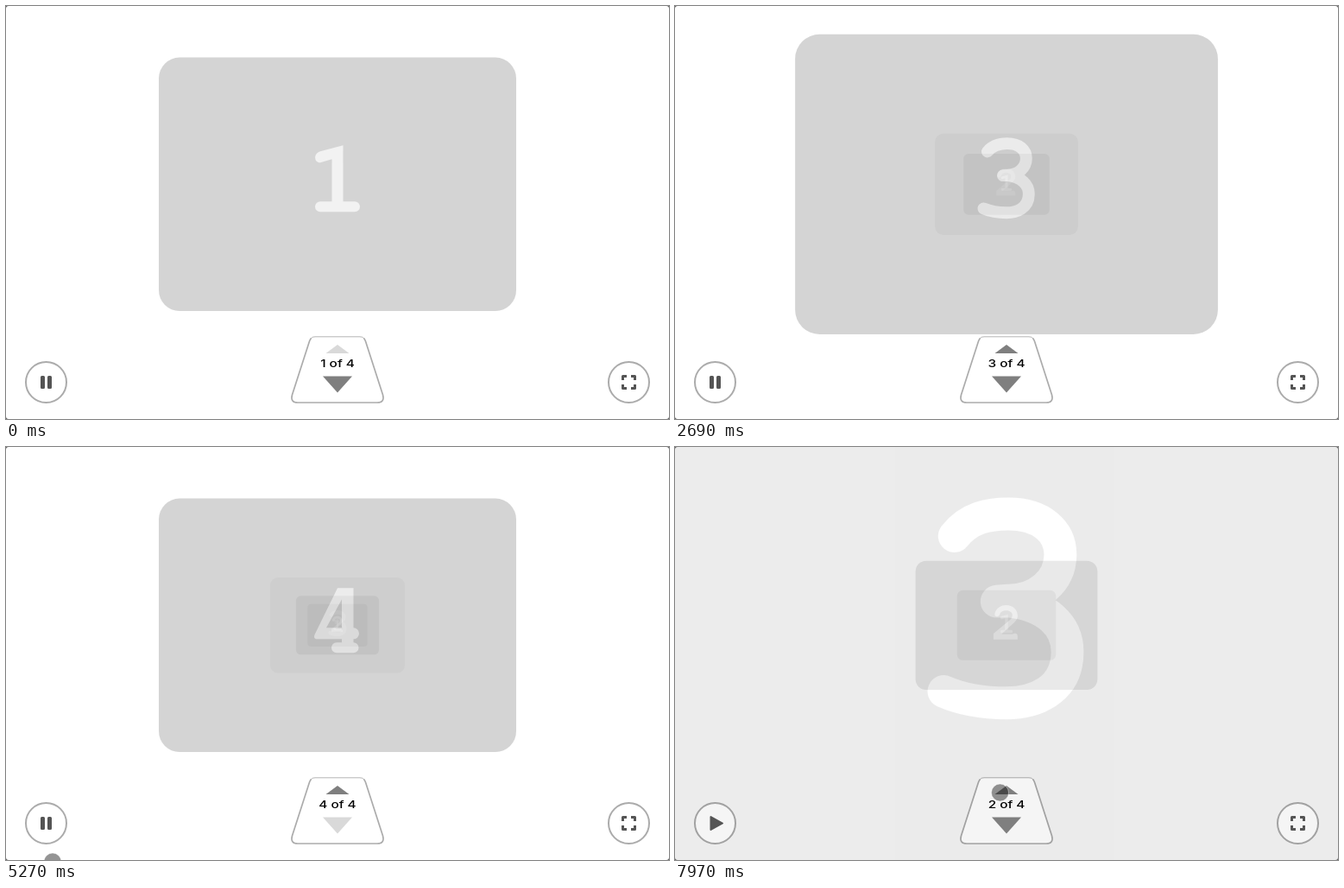
Animation of 768x478 px, one loop 8000 ms. Source, as an HTML page:

```html
<!DOCTYPE html>
<html lang="en">
<head>
<meta charset="utf-8">
<title>Depth carousel</title>
<style>
  html, body { margin: 0; width: 100%; height: 100%; overflow: hidden; background: #fff; }
  svg { display: block; width: 100vw; height: 100vh; }
  text { font: 500 11.8px Inter, sans-serif; text-anchor: middle; }
</style>
</head>
<body>
<svg viewBox="0 0 768 478" preserveAspectRatio="none">
  <rect width="768" height="478" fill="#fff"/>
  <g id="cards"></g>

  <g fill="#fff" fill-opacity=".5" stroke="#000" stroke-opacity=".33" stroke-width="2">
    <circle cx="46.5" cy="435.5" r="23.5"/>
    <circle cx="721.5" cy="435.5" r="23.5"/>
    <path stroke="none" d="M358 383H410Q415 383 416.500 388L436.500 450Q439 459 430 459H338Q329 459 331.500 450L351.500 388Q353 383 358 383Z"/>
    <path fill="none" stroke-width="1.700" d="M353.500 384.500Q352.300 386 351.500 388L331.500 450Q329 459 338 459H430Q439 459 436.500 450L416.500 388Q415.700 386 414.500 384.500"/>
    <path fill="none" stroke-width=".9" d="M353.500 384.500Q355 382.800 358 382.800H410Q413 382.800 414.500 384.500"/>
  </g>
  <g fill="#555">
    <path id="pause" d="M41.500 428H43.500Q45 428 45 429.500V441.500Q45 443 43.500 443H41.500Q40 443 40 441.500V429.500Q40 428 41.500 428ZM49.500 428H51.500Q53 428 53 429.500V441.500Q53 443 51.500 443H49.500Q48 443 48 441.500V429.500Q48 428 49.500 428Z"/>
    <path id="play" stroke="#555" stroke-width="2" stroke-linejoin="round" d="M41.500 428V443L55 435.500Z"/>
  </g>
  <path d="M714.500 433V428.500H719M724 428.500H728.500V433M728.500 438V442.500H724M719 442.500H714.500V438"
        fill="none" stroke="#555" stroke-width="3" stroke-linejoin="round"/>
  <path id="up" d="M384 392L397.500 402H370.500Z"/>
  <path id="down" d="M367 428.500H401L384 447.500Z"/>
  <text id="label" transform="translate(384 418) scale(1.300 1)"></text>

  <g id="pointer">
    <circle r="10" fill="#000" fill-opacity=".42" stroke="#fff" stroke-opacity=".4"/>
    <circle id="ring" r="21.500" fill="none" stroke="#000" stroke-width="1.500"/>
  </g>
  <path fill="#555" d="M0 0H3Q0 0 0 3ZM768 0V3Q768 0 765 0ZM0 478V475Q0 478 3 478ZM768 478H765Q768 478 768 475Z"/>
</svg>
<script>
const LOOP = 8000, SLIDE = 520, LABEL_LAG = 20;
const SPACING = 1.655; // depth between cards, in perspective units
const SHADES = [198, 180, 60, 85];
const DIGIT_SHADE = 238;

const moves = [[490, 1], [2301, 1], [4115, 1], [7150, -1], [7826, -1]];
const presses = [[5640, 5800], [7125, 7280], [7790, 7935]];
const trips = [
  { from: 5270, to: 5640, xs: [54, 15, 14, 49], ys: [480, 470, 448, 442] },
  { from: 6280, to: 6920, xs: [49, 160, 350, 376.5], ys: [442, 440, 380, 400] }
];

const digits = [
  '<path d="M6.5-45L-20-38C-28-36-27.500-25-20-25L-6.500-29V20H-20A6 6 0 0 0-20 32H20A6 6 0 0 0 20 20H6.500Z"/>',
  '<path transform="scale(.436)" d="M-68 74V44L20-30C32-40 34-60 24-68C8-84-28-78-34-60C-36-52-42-45-49-45C-58-45-64-53-61-62C-54-90-28-105-2-105C32-105 58-82 58-50C58-36 52-26 40-14L-26 46H32C37 42 44 41 50 44C56 47 58 52 58 58V74Z"/>',
  '<path transform="scale(.3165)" fill="none" stroke="currentColor" stroke-width="37" stroke-linecap="round" stroke-linejoin="round" d="M-59-101C-42-122-20-126 2-126C40-126 61-106 61-80C61-50 35-28 2-28L-11-27H5C45-22 69 0 69 30C69 75 30 88 0 88C-35 88-55 82-71 75"/>',
  '<path fill-rule="evenodd" d="M0-43H18.500V3A6.500 6.500 0 0 1 18.500 16V20A6 6 0 0 1 18.500 32H-1A6 6 0 0 1-1 20H5V16H-25Q-28 15-26.500 11ZM5 3H-13L5-30Z"/>'
];

const $ = id => document.getElementById(id);
const clamp = (v, lo = 0, hi = 1) => Math.min(hi, Math.max(lo, v));
const show = (el, on) => el.setAttribute('visibility', on ? 'visible' : 'hidden');
const gray = v => { const n = Math.round(clamp(v, 0, 255)); return `rgb(${n},${n},${n})`; };
const bezier = (p, s) => {
  const r = 1 - s;
  return r * r * r * p[0] + 3 * r * r * s * p[1] + 3 * r * s * s * p[2] + s * s * s * p[3];
};

// cubic-bezier(0, 0, .58, 1)
function easeOut(x) {
  let lo = 0, hi = 1;
  for (let i = 0; i < 24; i++) {
    const mid = (lo + hi) / 2;
    if (bezier([0, 0, .58, 1], mid) < x) lo = mid; else hi = mid;
  }
  return bezier([0, 0, 1, 1], lo);
}

$('cards').innerHTML = digits.map(d =>
  `<g><rect x="-207" y="-146.700" width="414" height="293.500" rx="24"/><g fill="currentColor">${d}</g></g>`).join('');
const cards = [...$('cards').children];

function shadeAt(k) {
  const d = clamp(k, 0, 3), i = Math.min(2, Math.floor(d));
  return SHADES[i] + (SHADES[i + 1] - SHADES[i]) * (d - i);
}

function opacityAt(k) {
  if (k < 0) return clamp(.75 + 2.58 * (k + .301), 0, .75);
  return .75 - .43 * Math.pow(Math.min(k, 1), 1.8);
}

function drawCard(card, k) {
  const opacity = k > -.59 ? opacityAt(k) : 0;
  show(card, opacity > 0);
  if (!opacity) return;
  const glow = 1 + Math.max(0, -.341 - k);
  card.setAttribute('transform', `translate(384 206.300) scale(${1 / (1 + SPACING * k)})`);
  card.setAttribute('opacity', opacity);
  card.firstChild.setAttribute('fill', gray(shadeAt(k) * glow));
  card.setAttribute('color', gray(DIGIT_SHADE * glow));
}

function drawPointer(t) {
  const trip = t < trips[1].from ? trips[0] : trips[1];
  const x = clamp((t - trip.from) / (trip.to - trip.from));
  const s = x * x * (3 - 2 * x);
  $('pointer').setAttribute('transform', `translate(${bezier(trip.xs, s)} ${bezier(trip.ys, s)})`);
  show($('pointer'), t >= 5265);
  show($('ring'), presses.some(([a, b]) => t >= a && t < b));
}

function render(t) {
  let pos = 0, page = 1;
  for (const [start, step] of moves) {
    if (t > start) pos += step * easeOut(clamp((t - start) / SLIDE));
    if (t > start + LABEL_LAG) page += step;
  }
  cards.forEach((card, i) => drawCard(card, pos - i));

  $('label').textContent = `${page} of 4`;
  $('up').setAttribute('fill', page > 1 ? '#7f7f7f' : '#d9d9d9');
  $('down').setAttribute('fill', page < 4 ? '#7f7f7f' : '#d9d9d9');
  const paused = t >= 5680;
  show($('pause'), !paused);
  show($('play'), paused);
  drawPointer(t);
}

const origin = performance.now();
function tick() {
  render((performance.now() - origin) % LOOP);
  requestAnimationFrame(tick);
}
render(0);
requestAnimationFrame(tick);
</script>
</body>
</html>
```
